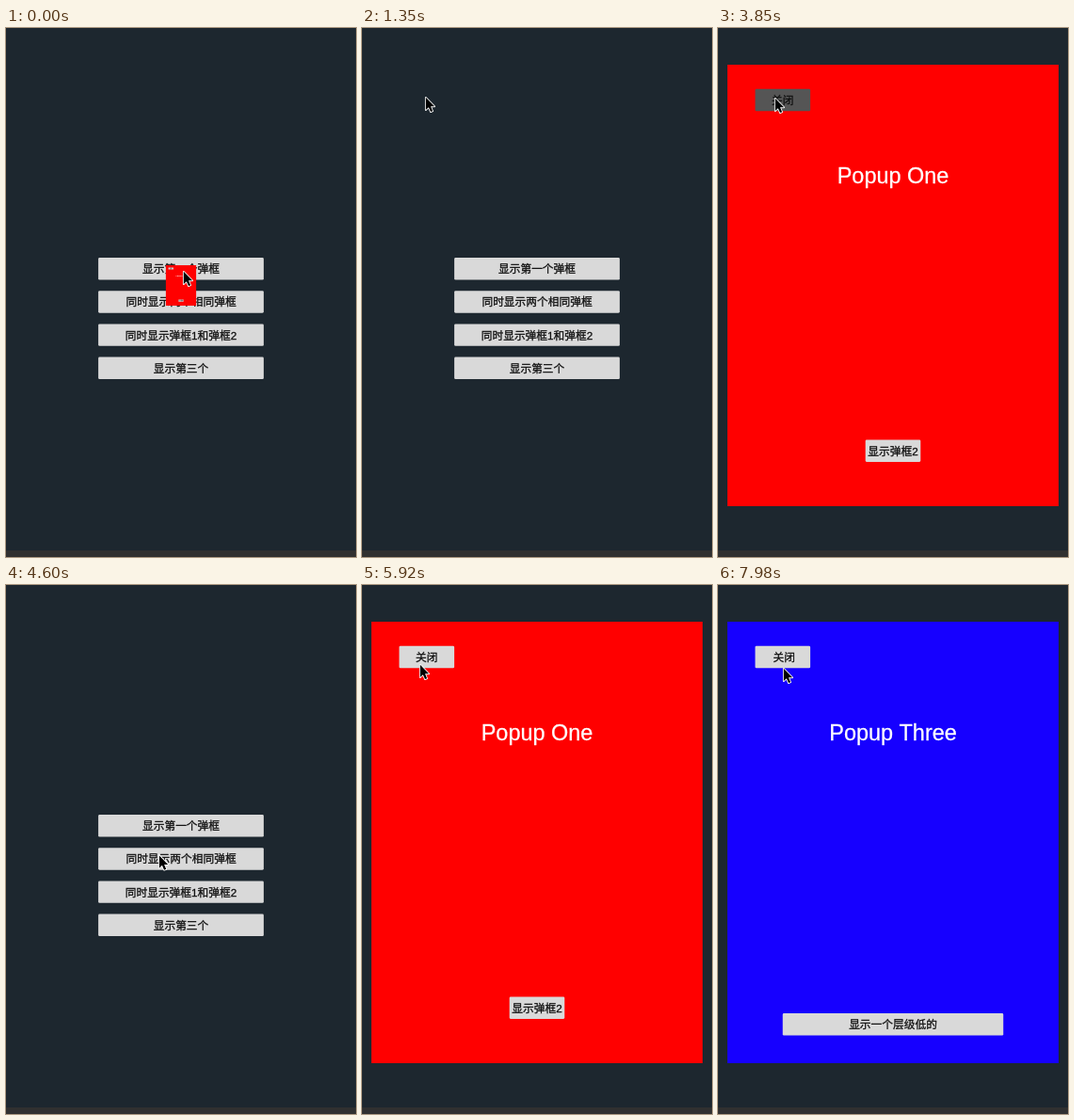
Write an HTML page with a canvas that moves like this. It is 372 px wide and 562 px high and loops after 8000 ms.

```html
<!DOCTYPE html>
<html lang="zh">
<head>
<meta charset="utf-8">
<style>
  html, body { margin: 0; width: 100%; height: 100%; overflow: hidden; background: #1d272f; }
  canvas { display: block; width: 372px; height: 562px; }
</style>
</head>
<body>
<canvas id="stage"></canvas>
<script>
const W = 372, H = 562, LOOP = 8000, STEP = 147.75, TRAVEL = 4;
const canvas = document.getElementById('stage');
const ctx = canvas.getContext('2d');
const dpr = window.devicePixelRatio || 1;
canvas.width = W * dpr;
canvas.height = H * dpr;

const FONT = '"Liberation Sans", "Noto Sans CJK SC", "Noto Sans CJK", sans-serif';
const BUTTON_H = 23.4;
const MENU = ['显示第一个弹框', '同时显示两个相同弹框', '同时显示弹框1和弹框2', '显示第三个'];

const one = { fill: '#ff0000', ink: '#fff', title: 'Popup One',
              action: { label: '显示弹框2', y: 175.7, w: 58.6 } };
const two = { fill: '#00ff00', ink: '#000', title: 'Popup Two' };
const three = { fill: '#1600ff', ink: '#fff', title: 'Popup Three', shift: 1.5,
                action: { label: '显示一个层级低的', y: 193.3, w: 234.5 } };

// Timing is counted in steps; a popup stays until the next click.
const clicks = [7, 15, 22, 26, 33, 38, 43, 50];
const shows = [[one, -0.02], [one, 15.9], [one, 22.9], [two, 34.16], [one, 38.9], [three, 50.42]];

// Pointer stops: [arrival step, x, y]
const stops = [
  [0, 188, 258], [6, 62, 78], [9, 67, 73], [15, 133, 290], [18, 133, 254], [21, 60, 74],
  [32, 181, 326], [35, 181, 304], [38, 61, 84], [49, 185, 361], [54, 69, 88]
];

const arrow = new Path2D('M0 0V15.2L3.5 11.9L6 17.6L8.4 16.6L6 11H10.7Z');

function backOut(u) {
  const v = Math.min(u, 1) - 1;
  return 1 + 2.70158 * v ** 3 + 1.70158 * v ** 2;
}

function pointerAt(n) {
  const i = Math.max(1, stops.findIndex(s => s[0] >= n));
  const [a, ax, ay] = stops[i - 1], [b, bx, by] = stops[i];
  const start = Math.max(a, b - TRAVEL);
  const u = Math.max(0, (n - start) / (b - start)), e = u * u * (3 - 2 * u);
  return [ax + (bx - ax) * e, ay + (by - ay) * e];
}

function currentShow(n) {
  return shows.find(([, open]) => {
    const close = clicks.find(c => c > open) ?? Infinity;
    return n >= open && n <= close;
  });
}

function text(str, x, baseline, size, color) {
  ctx.font = `${size}px ${FONT}`;
  ctx.fillStyle = ctx.strokeStyle = color;
  ctx.lineWidth = 0.3;
  ctx.strokeText(str, x, baseline);
  ctx.fillText(str, x, baseline);
}

function button(label, x, y, w, pressed, shift = 0) {
  ctx.fillStyle = pressed ? '#555' : '#d9d9d9';
  ctx.beginPath();
  ctx.roundRect(x - w / 2, y - BUTTON_H / 2, w, BUTTON_H, 1.3);
  ctx.fill();
  text(label, x + shift, y + 4.4, 11.72, '#111');
}

function popup({ fill, ink, title, shift, action }, scale, pressed) {
  ctx.save();
  ctx.translate(186, 273.5);
  ctx.scale(scale, scale);
  ctx.fillStyle = fill;
  ctx.fillRect(-176, -234.5, 352, 469);
  text(title, 0, -108.4, 23.45, ink);
  button('关闭', -117.2, -197, 58.6, pressed, shift);
  if (action) button(action.label, 0, action.y, action.w);
  ctx.restore();
}

function pointer(x, y) {
  ctx.save();
  ctx.translate(x + 0.8, y + 0.8);
  ctx.scale(0.87, 0.87);
  ctx.lineJoin = 'round';
  ctx.lineWidth = 2;
  ctx.strokeStyle = '#fff';
  ctx.stroke(arrow);
  ctx.fillStyle = '#000';
  ctx.fill(arrow);
  ctx.restore();
}

function draw() {
  const n = Math.floor(performance.now() % LOOP / STEP);
  const [px, py] = pointerAt(n);
  const clicking = clicks.includes(n);
  const show = currentShow(n);

  ctx.setTransform(dpr, 0, 0, dpr, 0, 0);
  ctx.textAlign = 'center';
  ctx.fillStyle = '#1d272f';
  ctx.fillRect(0, 0, W, H);
  ctx.fillStyle = '#303030';
  ctx.fillRect(0, 555, W, 7);
  MENU.forEach((label, i) => {
    const y = 255.8 + i * 35.17;
    button(label, 186, y, 175.8, clicking && !show && Math.abs(py - y) < BUTTON_H / 2);
  });
  if (show) popup(show[0], backOut(n - show[1]), clicking);
  pointer(px, py);
  requestAnimationFrame(draw);
}
draw();
</script>
</body>
</html>
```
